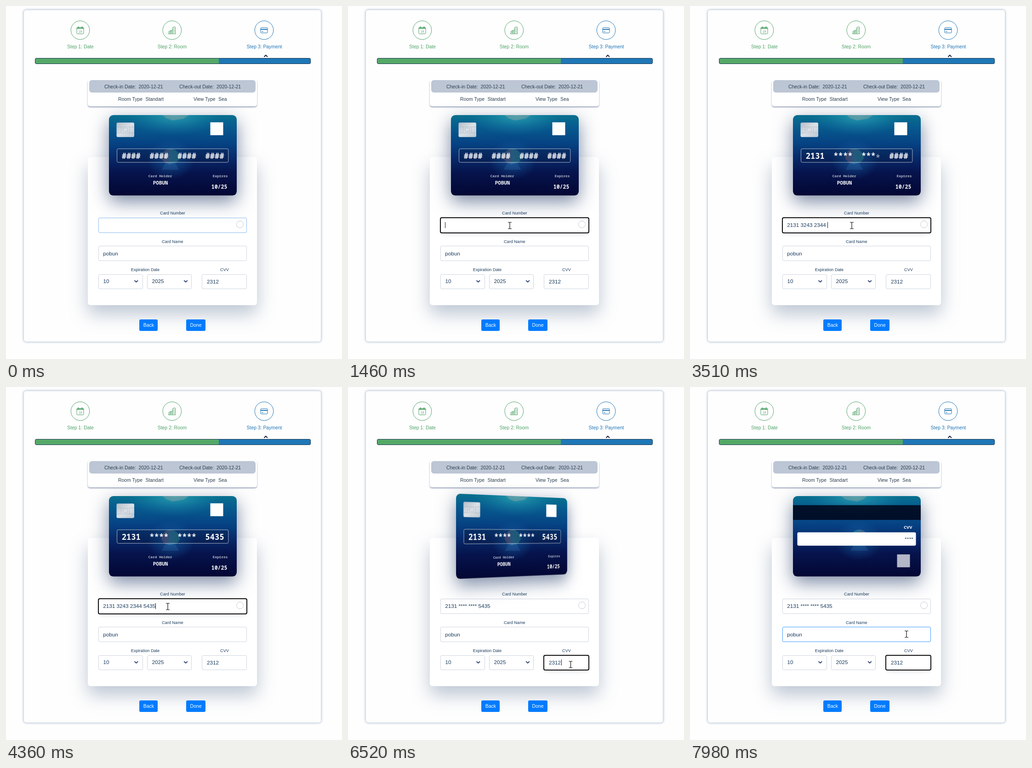
Write an HTML page that moves like this. It is 731x767 px and loops after 8 s.

```html
<!DOCTYPE html>
<html lang="en">
<head>
<meta charset="utf-8">
<title>Payment form</title>
<style>
html, body { margin: 0; width: 100%; height: 100%; overflow: hidden; background: #fefefe; }
div, svg { position: absolute; box-sizing: border-box; }
svg { overflow: hidden; }
text { font: 10.4px "Liberation Sans", Arial, sans-serif; fill: #2c3e50; }
.mid text, .mid { text-anchor: middle; }
.label text { font-size: 9.15px; fill: #1a3b5d; }
.value text { font-size: 11.7px; fill: #1a3b5d; }
.line { fill: none; stroke: currentColor; }
.green { color: #4fa267; }
.blue { color: #1f74b4; }
.green text, .blue text { fill: currentColor; }
#panel { left: 39px; top: 9px; width: 646px; height: 720px; border-radius: 5px; background: #fefefe; box-shadow: 0 0 5px 1px #aebdd0; }
#bar { left: 62.5px; top: 113px; width: 600px; height: 13px; border: 1px solid #17364f; border-radius: 3px; background: linear-gradient(90deg, #55a868 399px, #1f77b7 0); }
#summary { left: 178px; top: 160px; width: 368px; height: 58px; border-radius: 5px; background: #fff; box-shadow: 0 2px 3px #4c608a90; }
#dates { left: 3px; top: 1px; width: 362px; height: 27px; border-radius: 6px; background: #bcc6d4; }
#form { left: 178px; top: 328px; width: 368px; height: 322px; border-radius: 6px; background: #fff; box-shadow: 0 19px 39px #5a749466; }
.field { height: 32px; border: 1px solid #ced6e0; border-radius: 3px; background: #fff; }
.field.focus { outline: 2px solid #101010; outline-offset: -1px; box-shadow: 0 6px 13px -8px #20387559; }
.button { top: 681px; height: 25px; border-radius: 3px; background: #007bff; }
.face { left: 223.5px; top: 237.3px; width: 278px; height: 174.5px; border-radius: 9.5px; box-shadow: 0 13px 39px #0e2a5a8c; backface-visibility: hidden; }
.face text { font-family: "Noto Sans Mono", "DejaVu Sans Mono", monospace; font-weight: 600; fill: #fff; }
.face .small { font-size: 7.85px; fill: #ffffffb3; }
#digits text { font-size: 17px; text-anchor: middle; }
</style>
</head>
<body>
<div id="panel"></div>
<div id="bar"></div>
<div id="summary"><div id="dates"></div></div>
<div id="form"></div>
<div class="field" id="number" style="left:201px;top:460px;width:323px;height:33px"></div>
<div class="field" id="holder" style="left:201px;top:521px;width:323px;height:33px"></div>
<div class="field" style="left:201px;top:583px;width:97px"></div>
<div class="field" style="left:307px;top:583px;width:97px"></div>
<div class="field" id="cvv" style="left:426px;top:583px;width:98px"></div>
<div class="button" style="left:290px;width:40px"></div>
<div class="button" style="left:392px;width:42px"></div>

<svg class="face" id="front" viewBox="223.5 237.3 278 174.5">
  <defs>
    <linearGradient id="sea" x2="0" y2="1">
      <stop stop-color="#08708f"/><stop offset=".13" stop-color="#075d8f"/>
      <stop offset=".35" stop-color="#064384"/><stop offset=".52" stop-color="#072b6c"/>
      <stop offset=".72" stop-color="#06134c"/><stop offset="1" stop-color="#030733"/>
    </linearGradient>
    <radialGradient id="sun"><stop stop-color="#3dbcc6" stop-opacity=".6"/><stop offset="1" stop-color="#1a8fb0" stop-opacity="0"/></radialGradient>
    <radialGradient id="glow"><stop stop-color="#1b71b5" stop-opacity=".55"/><stop offset="1" stop-color="#1b71b5" stop-opacity="0"/></radialGradient>
    <linearGradient id="bell"><stop stop-color="#9a5878" stop-opacity=".5"/><stop offset=".5" stop-color="#3a7f9d" stop-opacity=".7"/><stop offset="1" stop-color="#26908f" stop-opacity=".6"/></linearGradient>
    <linearGradient id="silver" x2="1" y2="1"><stop stop-color="#b5bdc8"/><stop offset=".5" stop-color="#dce1e7"/><stop offset="1" stop-color="#bec7d1"/></linearGradient>
  </defs>
  <g id="sea-scene">
    <path fill="url(#sea)" d="M223 237h279v175h-279z"/>
    <ellipse cx="366" cy="239" rx="105" ry="42" fill="url(#sun)"/>
    <path fill="#b5aaa0" opacity=".35" d="M340 237h58l-12 8-24 4-14-5z"/>
    <ellipse cx="358" cy="334" rx="52" ry="44" fill="url(#glow)"/>
    <path fill="url(#bell)" d="M337 331q4-21 21-21 17 2 20 21l-7 9-16 4-11-4z"/>
    <path fill="#3a79b3" opacity=".25" d="M347 340h20l9 16h-38z"/>
  </g>
  <rect x="240" y="253.5" width="38.500" height="31.500" rx="3" fill="url(#silver)"/>
  <path class="line" style="color:#aab5c2" stroke-width=".7" d="M240 263h10v13h-10M278 263h-10v13h10M250 263h18M250 276h18M254 265.500h10v7h-10z"/>
  <rect x="444" y="253" width="28" height="28" fill="#fff"/>
  <rect id="frame" rx="3" fill="#08142f" fill-opacity=".25" stroke="#fff" stroke-opacity=".65"/>
  <g id="digits"></g>
  <text class="small mid" x="335" y="372.500">Card Holder</text>
  <text class="mid" x="335.500" y="388.500" style="font-size:10.8px">POBUN</text>
  <text class="small" x="449" y="372.500">Expires</text>
  <text x="446.300" y="397" style="font-size:11.5px">10/25</text>
</svg>

<svg class="face" id="back" viewBox="223.5 237.3 278 174.5">
  <use href="#sea-scene" transform="translate(725 0) scale(-1 1)"/>
  <path fill="#000013" fill-opacity=".82" d="M223 257h279v32h-279z"/>
  <text x="464.500" y="308.500" style="font:bold 9.5px 'Open Sans',sans-serif">CVV</text>
  <rect x="233" y="316" width="258" height="29" rx="3" fill="#fff"/>
  <text class="small" x="466.500" y="332" style="fill:#1a3b5d">****</text>
  <rect x="450" y="364" width="28" height="28" fill="#fff" opacity=".7"/>
</svg>

<svg width="731" height="767" style="left:0;top:0">
  <g class="green mid">
    <circle class="line" cx="161.500" cy="52.500" r="20.300"/>
    <rect class="line" x="154" y="46.500" width="15" height="14" rx="1.500"/>
    <path class="line" stroke-width="2" d="M154 48.500h15M157.500 44.500v3M165.500 44.500v3"/>
    <text x="161.500" y="57.500" style="font-size:6.5px">19</text>
    <text x="162" y="92">Step 1: Date</text>
    <circle class="line" cx="361.300" cy="52.500" r="20.300"/>
    <path class="line" d="M353 60.500h16M354.500 60v-5l4-2v7M358.500 54l4-3v9M362.500 60v-13l4-2 2 1v14"/>
    <path class="line" stroke-width="2" stroke-dasharray="1 1" d="M356.500 55.500v4M360.500 53.500v6M365.500 47.500v12"/>
    <text x="361.500" y="92">Step 2: Room</text>
  </g>
  <g class="blue mid">
    <circle class="line" cx="561.500" cy="52.500" r="20.300"/>
    <rect class="line" x="554" y="47" width="15" height="11.500" rx="1.500"/>
    <path class="line" stroke-width="2" d="M554 50.800h15"/><path class="line" d="M556 55.500h4"/>
    <text x="562" y="92">Step 3: Payment</text>
  </g>
  <path class="line" style="color:#101c3c" stroke-width="1.800" d="M561.500 110.500l3.700-3.700 3.700 3.700"/>
  <text x="214" y="178.800">Check-in Date:</text><text x="288.500" y="178.800">2020-12-21</text>
  <text x="377" y="178.800">Check-out Date:</text><text x="458" y="178.800">2020-12-21</text>
  <text x="244" y="205.500">Room Type</text><text x="303.500" y="205.500">Standart</text>
  <text x="408" y="205.500">View Type</text><text x="462" y="205.500">Sea</text>
  <g class="label mid">
    <text x="362.500" y="453">Card Number</text><text x="362.300" y="515">Card Name</text>
    <text x="303" y="576">Expiration Date</text><text x="475.500" y="576">CVV</text>
  </g>
  <g class="value">
    <text id="typed" x="211.300" y="480"></text><text x="211.300" y="541.500">pobun</text>
    <text x="211.500" y="602">10</text><text x="317.500" y="602">2025</text><text x="437" y="603">2312</text>
  </g>
  <circle class="line" style="color:#c3c9d2" cx="509" cy="474.500" r="7.500"/>
  <path class="line" style="color:#36487c" stroke-width="1.900" d="M279.500 596.200l3.800 3.600 3.800-3.600M387.200 596.200l3.800 3.600 3.800-3.600"/>
  <g class="mid"><text x="310.300" y="697" fill="#fff" style="fill:#fff">Back</text><text x="413" y="697" style="fill:#fff">Done</text></g>
  <path id="caret" stroke="#101828" d="M0-6.500v13"/>
  <path id="arrow" fill="#fff" stroke="#111" d="M0 0v14.500l3.400-3.200 2.600 5.700 2.500-1.100-2.500-5.600h4.600z"/>
  <path id="beam" fill="none" stroke="#111" stroke-width="1.200" d="M-4-7h3l1 1 1-1h3M0-6v12M-4 7h3l1-1 1 1h3"/>
</svg>

<script>
const $ = id => document.getElementById(id);
const LOOP = 8000, FOCUS = 1090, CVV_FOCUS = 6200;
const NUMBER = "2131324323445435";
const keyTimes = [1620, 1720, 1850, 1980, 2200, 2500, 2520, 2620, 2800, 2880, 3020, 3280, 3520, 3680, 3830, 3990];
const path = [[70, 712, 768], [330, 572, 592], [680, 430.5, 499], [1000, 352, 477], [4480, 352, 477], [4850, 400, 512],
  [5250, 455, 572], [5780, 483, 602], [6150, 483, 602], [6400, 484.5, 603], [7240, 484.5, 603], [7700, 471, 537]];
const areas = { number: [201, 460, 524, 493], holder: [201, 521, 524, 554], cvv: [426, 583, 524, 615] };

const clamp = v => Math.min(1, Math.max(0, v));
const mix = (a, b, p) => a + (b - a) * p;

function bezier(x1, y1, x2, y2) {
  const at = (a, b, s) => 3 * (1 - s) * s * ((1 - s) * a + s * b) + s ** 3;
  return x => {
    if (x <= 0 || x >= 1) return clamp(x);
    let lo = 0, hi = 1;
    for (let i = 0; i < 24; i++) {
      const s = (lo + hi) / 2;
      if (at(x1, x2, s) < x) lo = s; else hi = s;
    }
    return at(y1, y2, lo);
  };
}
const swing = bezier(.71, .03, .56, .85);
const easeInOut = bezier(.42, 0, .58, 1);

function addDigit(char, i) {
  const el = document.createElementNS("http://www.w3.org/2000/svg", "text");
  el.textContent = char;
  el.setAttribute("x", 256.3 + i % 4 * 10.3 + (i >> 2) * 60.6);
  el.setAttribute("y", 332.3);
  return $("digits").appendChild(el);
}
const slots = [...NUMBER].map((d, i) => [addDigit("#", i), addDigit(i > 3 && i < 12 ? "*" : d, i)]);

function pointer(t) {
  const next = path.findIndex(k => k[0] > t);
  if (next < 0) return path.at(-1).slice(1);
  if (!next) return [750, 790];
  const [t0, x0, y0] = path[next - 1], [t1, x1, y1] = path[next];
  const p = (t - t0) / (t1 - t0);
  return [mix(x0, x1, p), mix(y0, y1, p)];
}
const inside = ([x, y], [l, t, r, b]) => x > l && x < r && y > t && y < b;

// Share of the last 300 ms that the pointer spent over a field.
function hover(t, id) {
  let hits = 0;
  for (let i = 0; i < 10; i++) hits += inside(pointer(t - i * 30), areas[id]);
  return Math.max(hits / 10, id === "number" ? .45 * (1 - t / 200) : 0);
}

function place(el, x, y, shown = true) {
  el.setAttribute("transform", `translate(${x} ${y})`);
  el.style.opacity = +shown;
}

function drawDigits(t) {
  slots.forEach(([old, fresh], i) => {
    const leave = easeInOut((t - keyTimes[i]) / 250), enter = easeInOut((t - keyTimes[i] - 100) / 250);
    place(old, 0, -9.7 * leave, 1 - leave);
    place(fresh, 0, 9.7 * (1 - enter), enter);
  });
}

function drawFrame(t) {
  const f = t < FOCUS ? 1 - swing((t - 70) / 350)
    : swing((t - FOCUS) / 350) - swing((t - CVV_FOCUS - 300) / 350);
  const from = [224, 237.8, 277, 173.5], to = [241, 310.5, 242.3, 29.5];
  ["x", "y", "width", "height"].forEach((name, i) => $("frame").setAttribute(name, mix(from[i], to[i], f)));
  $("frame").style.opacity = f;
}

function drawCard(t) {
  const p = swing((t - CVV_FOCUS + 10) / 800), depth = 646 * (2 - p);
  const turn = angle => angle ? `perspective(${depth}px) rotateY(${angle}deg)` : "none";
  $("front").style.transform = turn(180 * p);
  $("back").style.transform = turn(180 * p - 180);
}

function drawFields(t) {
  const count = keyTimes.filter(k => k <= t).length, onCvv = t >= CVV_FOCUS;
  let typed = NUMBER.slice(0, count).replace(/(.{4})(?!$)/g, "$1\u00a0");
  if (count && count < 16 && count % 4 === 0) typed += "\u00a0";
  if (onCvv) typed = "2131 **** **** 5435";
  if ($("typed").textContent !== typed) $("typed").textContent = typed;

  const since = onCvv ? CVV_FOCUS : count ? keyTimes[count - 1] : FOCUS;
  const lit = t >= FOCUS && Math.floor((t - since) / 500) % 2 === 0;
  if (onCvv) place($("caret"), 464.5, 598.5, lit);
  else place($("caret"), Math.round(211.3 + $("typed").getComputedTextLength()) + .5, 476, lit);

  $("number").classList.toggle("focus", t >= FOCUS && !onCvv);
  $("cvv").classList.toggle("focus", onCvv);
  for (const id in areas) {
    const h = hover(t, id);
    $(id).style.borderColor = `rgb(${mix(206, 61, h)}, ${mix(214, 156, h)}, ${mix(224, 255, h)})`;
  }
}

function drawPointer(t) {
  const pos = pointer(t), overText = Object.values(areas).some(a => inside(pos, a));
  place($("beam"), ...pos, overText);
  place($("arrow"), ...pos, !overText);
}

function draw() {
  const t = performance.now() % LOOP;
  [drawDigits, drawFrame, drawCard, drawFields, drawPointer].forEach(part => part(t));
  requestAnimationFrame(draw);
}
draw();
</script>
</body>
</html>
```
